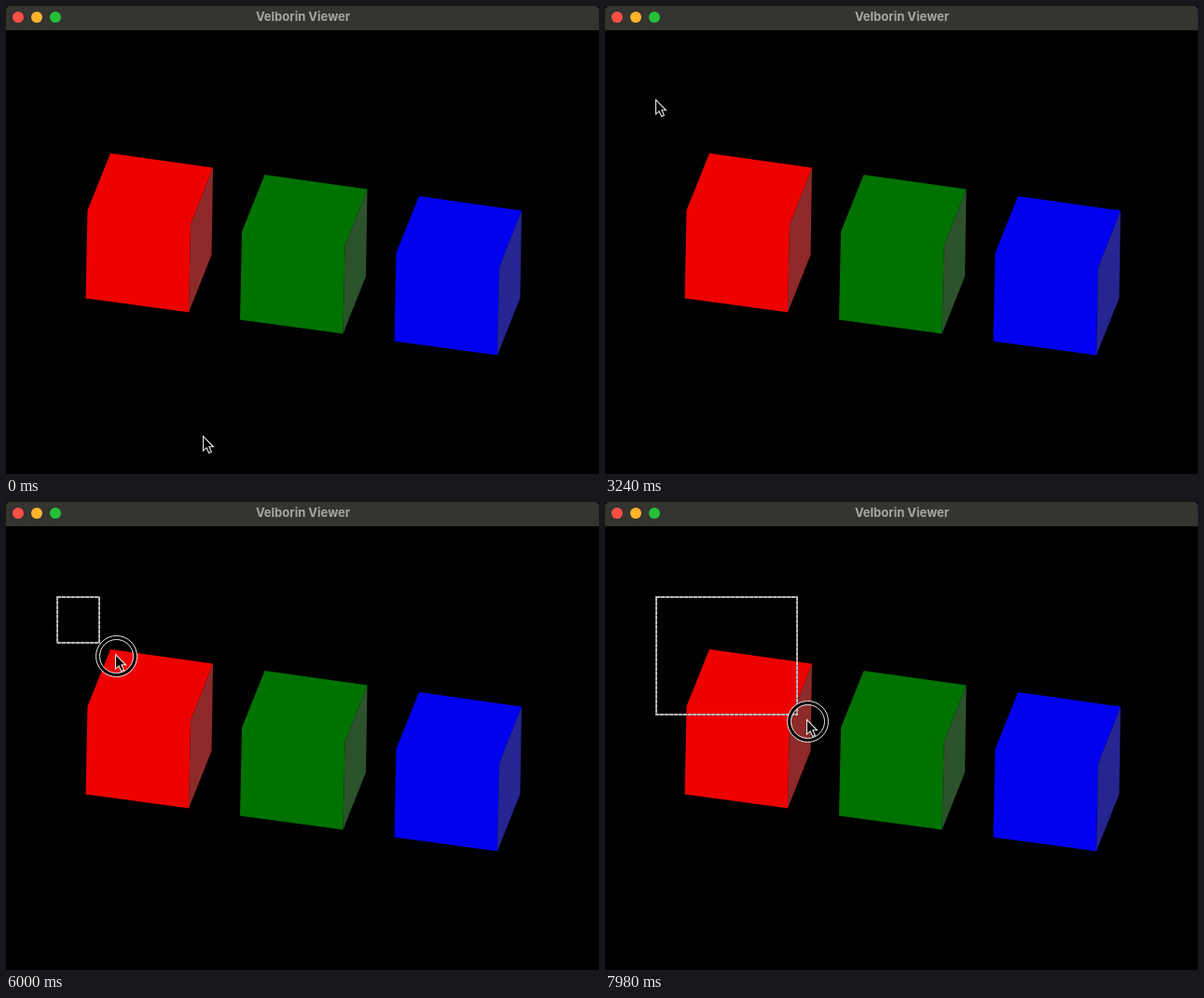
These frames come from a looping animation (636x502 px, 8000 ms). An HTML page:

```html
<!DOCTYPE html>
<html lang="en">
<head>
<meta charset="utf-8">
<title>Viewer</title>
<style>
  html, body { margin: 0; width: 100%; height: 100%; overflow: hidden; background: #000; }
  svg { display: block; width: 636px; height: 502px; }
  .title { font: 700 13px Inter, "Open Sans", sans-serif; fill: #a6a6a2; text-anchor: middle; }
  .thin { fill: none; stroke: #e6e6e6; }
  .band { fill: none; stroke: #727272; stroke-width: 2; }
  .dash { stroke: #b8b8b8; stroke-dasharray: 4 1; }
</style>
</head>
<body>
<svg viewBox="0 0 636 502">
  <rect width="636" height="502"/>
  <path d="M0 26V5Q0 0 5 0H631Q636 0 636 5V26Z" fill="#343430"/>
  <circle cx="13" cy="12" r="6" fill="#fe5044"/>
  <circle cx="33" cy="12" r="6" fill="#fdb32a"/>
  <circle cx="53" cy="12" r="6" fill="#26c138"/>
  <text class="title" x="318.5" y="16">Velborin Viewer</text>
  <g id="cubes"></g>
  <g id="selection">
    <rect class="band" x="55" y="102"/>
    <rect class="band dash" x="55" y="102"/>
  </g>
  <g id="pointer">
    <g id="ring" transform="translate(1 2)">
      <circle r="20" fill="none" stroke="#000" stroke-width="3.4"/>
      <circle class="thin" r="22"/>
      <circle class="thin" r="18"/>
    </g>
    <path d="M0 0V15.6L3.6 12.4L6.2 18L8.9 16.8L6.4 11.3H11Z" stroke="#e6e6e6" stroke-width="1.1"/>
  </g>
</svg>
<script>
const LOOP = 8000;
const PRESS = 90;
const DRAG = 98;

// Rows: step, x, y
const pointerPath = [
  [1, 211, 461], [18, 188, 416], [35, 153, 331], [53, 78, 159], [66, 54, 100],
  [DRAG, 54, 100], [116, 86, 138], [141, 147, 185], [155, 180, 209], [172, 216, 233]
];
const cornerPath = [
  [DRAG, 55, 102], [116, 79, 133], [141, 123, 168], [155, 161, 195], [172, 206, 228]
];

const $ = id => document.getElementById(id);

function drawCubes() {
  const colors = [["#ee0000", "#8e2a2a"], ["#007200", "#2c522c"], ["#0000f0", "#262692"]];
  $("cubes").innerHTML = colors.map(([face, side], i) => `
    <g transform="translate(${165.5 * i} ${23 * i})">
      <path fill="${face}" d="M112 158L222 173.5L198 234.5L196 328.5L85.5 313.5L87.5 219Z"/>
      <path fill="${side}" d="M222 173.5L220.5 267L196 328.5L198 234.5Z"/>
    </g>`).join("");
}

// Smooth monotone curve through the keys of one column
function sample(keys, step, col) {
  const last = keys.length - 1;
  const secant = i => (keys[i + 1][col] - keys[i][col]) / (keys[i + 1][0] - keys[i][0]);
  const slope = i => {
    if (i === 0) return secant(0);
    if (i === last) return secant(last - 1);
    const a = secant(i - 1), b = secant(i);
    return a * b > 0 ? 2 * a * b / (a + b) : 0;
  };
  if (step <= keys[0][0]) return keys[0][col];
  if (step >= keys[last][0]) return keys[last][col];
  const i = keys.findIndex(k => k[0] > step) - 1;
  const span = keys[i + 1][0] - keys[i][0];
  const u = (step - keys[i][0]) / span, v = 1 - u;
  return v * v * (1 + 2 * u) * keys[i][col] + u * u * (3 - 2 * u) * keys[i + 1][col]
    + span * u * v * (v * slope(i) - u * slope(i + 1));
}

// Every 140 ms holds three steps: 20, 20 and 100 ms long
function stepAt(time) {
  const t = time + 20;
  return 3 * Math.floor(t / 140) + Math.min(2, Math.floor(t % 140 / 20));
}

function render(time) {
  const step = stepAt(time);
  const at = (keys, col) => Math.round(sample(keys, step, col));
  $("pointer").setAttribute("transform",
    `translate(${at(pointerPath, 1) + .5} ${at(pointerPath, 2) + .5})`);
  $("ring").style.display = step >= PRESS ? "" : "none";
  $("selection").style.display = step > DRAG ? "" : "none";
  for (const band of $("selection").children) {
    band.setAttribute("width", at(cornerPath, 1) - 55);
    band.setAttribute("height", at(cornerPath, 2) - 102);
  }
}

drawCubes();
const start = performance.now();
function tick() {
  render((performance.now() - start) % LOOP);
  requestAnimationFrame(tick);
}
tick();
</script>
</body>
</html>
```
